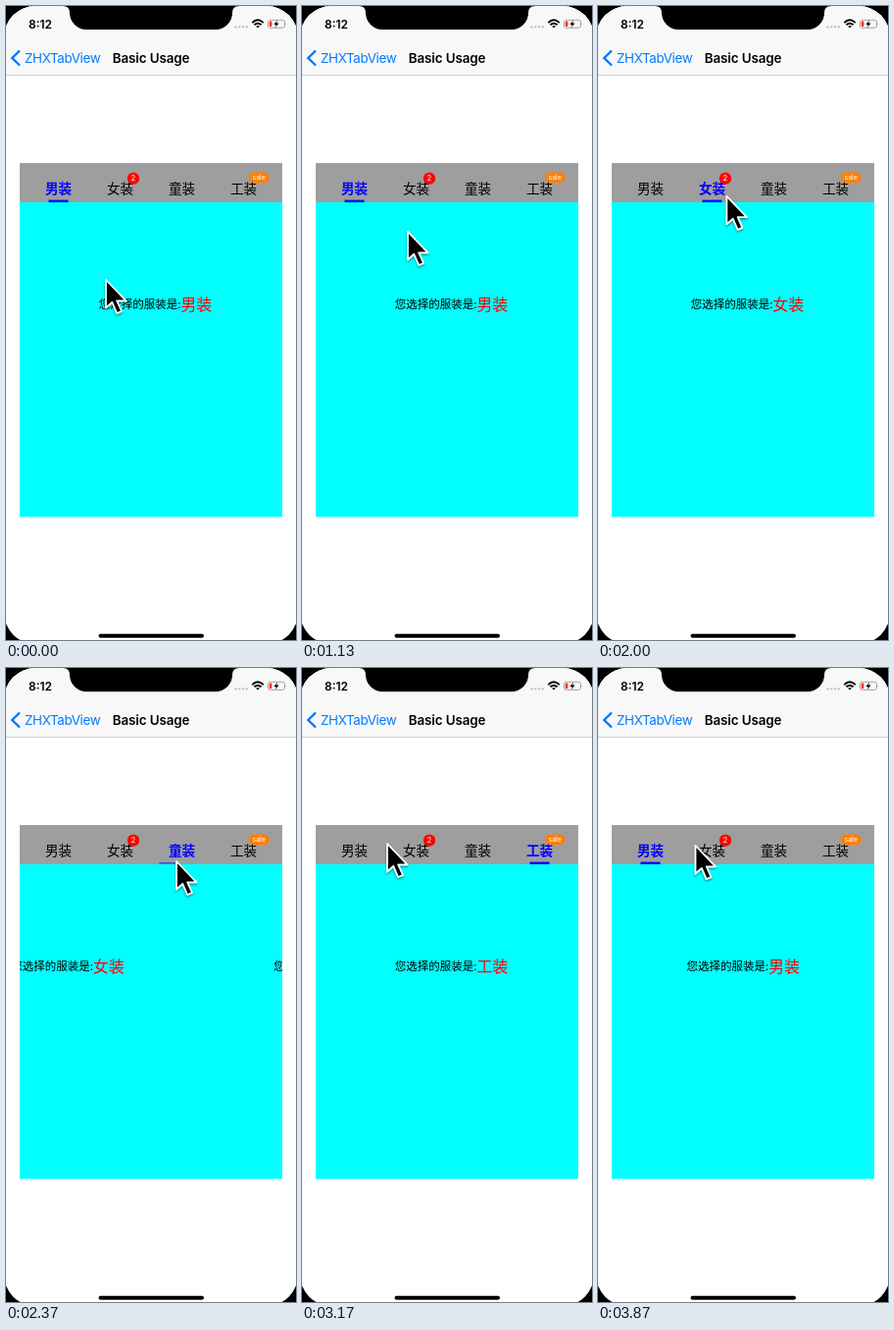
Recreate the animation shown at these times as an HTML page. Size 296 by 646 pixels, loop 3.91 s.

```html
<!DOCTYPE html>
<html lang="zh">
<head>
<meta charset="utf-8">
<title>Tab view</title>
<style>
  html, body { margin: 0; width: 100%; height: 100%; overflow: hidden; background: #fff; }
  svg { display: block; width: 100%; height: 100%; }
  text { font-family: Inter, "Noto Sans CJK SC", "Noto Sans CJK", "Noto Sans", sans-serif; }
  .cjk { font-family: "Noto Sans CJK SC", "Noto Sans CJK", sans-serif; }
  .tab { font-size: 13.6px; text-anchor: middle; }
  .tab.selected { fill: #00f; font-weight: 700; }
  .badge { fill: #fff; text-anchor: middle; }
  .choice { font-size: 16px; font-weight: 500; fill: #f00; }
</style>
</head>
<body>
<svg viewBox="0 0 296 646" xmlns="http://www.w3.org/2000/svg">
  <defs>
    <clipPath id="panel"><rect x="14" y="200" width="268" height="320"/></clipPath>
    <clipPath id="screen"><rect x="-2" width="300" height="650" rx="32"/></clipPath>
    <filter id="soft" x="-50%" y="-50%" width="200%" height="200%">
      <feDropShadow dx="0" dy="1.5" stdDeviation="1.3" flood-opacity=".45"/>
    </filter>
  </defs>
  <rect width="296" height="646"/>
  <g clip-path="url(#screen)">
    <rect width="296" height="646" fill="#fff"/>
    <rect width="296" height="70" fill="#f8f8f8"/>
    <rect y="70" width="296" height="1" fill="#d2d2d2"/>
  </g>

  <text x="23" y="22.5" font-size="12" font-weight="600">8:12</text>
  <g fill="#c4c4c4">
    <circle cx="234.5" cy="21.3" r="1.2"/><circle cx="238.3" cy="21.3" r="1.2"/>
    <circle cx="242.1" cy="21.3" r="1.2"/><circle cx="245.9" cy="21.3" r="1.2"/>
  </g>
  <g fill="none" stroke="#000" stroke-width="1.9">
    <path d="M251.3 17.1Q257 11.5 262.7 17.1M253.5 19.3Q257 16 260.5 19.3"/>
    <path d="M255.2 20.6Q257 19.2 258.8 20.6L257 22.5Z" fill="#000" stroke="none"/>
  </g>
  <rect x="267.5" y="14.3" width="17" height="8" rx="2.2" fill="none" stroke="#999" stroke-width=".9"/>
  <path d="M285.7 16.8q1.3 1.5 0 3z" fill="#999"/>
  <rect x="268.8" y="15.6" width="2.6" height="5.4" rx=".8" fill="#ff2d2d"/>
  <path d="M277 14.6L273.4 18.9H275.7L274.8 22L278.5 17.6H276.1Z"/>

  <path d="M14 45.5L6.3 53L14 60.5" fill="none" stroke="#007aff" stroke-width="2.4"/>
  <text x="19" y="57.8" font-size="13.4" letter-spacing="-.34" fill="#007aff">ZHXTabView</text>
  <text x="108.8" y="57.8" font-size="13.4" font-weight="600" letter-spacing="-.1">Basic Usage</text>

  <rect x="14" y="160" width="268" height="40" fill="#9e9e9e"/>
  <rect x="14" y="200" width="268" height="320.6" fill="#0ff"/>
  <g id="tabs"></g>
  <rect id="bar" width="20" fill="#00f"/>
  <circle cx="130" cy="175.6" r="6.2" fill="#f00"/>
  <text class="badge" x="130" y="178.4" font-size="7.8">2</text>
  <rect x="248" y="169.5" width="20.5" height="10.5" rx="5" fill="#ff7f00"/>
  <text class="badge" x="258.2" y="177" font-size="7">sale</text>
  <g clip-path="url(#panel)"><g id="pages"></g></g>

  <path d="M58 0Q65 0 65 7A17 17 0 0 0 82 24H214A17 17 0 0 0 231 7Q231 0 238 0Z"/>
  <rect x="94.5" y="639.8" width="107.5" height="4" rx="2"/>
  <path id="cursor" d="M0 0V28.5L6.3 22.8L11.2 34L16 32L11.2 21.3H20.5Z"
        stroke="#fff" stroke-width="1.8" stroke-linejoin="round" filter="url(#soft)"/>
</svg>
<script>
const LOOP = 3910, STEP = 100 / 3;
const PAGE_WIDTH = 268, TAB_GAP = 63, FIRST_TAB = 53.5;
const SCROLL_MS = 340, BAR_MS = 187;
const names = ['男装', '女装', '童装', '工装'];
const taps = [[1665, 1], [2235, 2], [2715, 3], [3541, 0]];
// Pointer stops: time, x, y
const stops = [
  [0, 102, 279], [630, 109, 491], [1130, 108, 230], [1500, 105, 193], [1700, 106, 192],
  [1850, 108, 192], [2220, 173, 197], [2366, 174, 197], [2680, 211, 197],
  [2866, 212, 197], [3166, 87, 179], [3430, 53, 181], [3600, 55, 182], [3866, 99.5, 181]
];

const byId = id => document.getElementById(id);
const mix = (a, b, k) => a + (b - a) * k;
const ease = p => {
  p = Math.min(1, Math.max(0, p));
  return p * p * (3 - 2 * p);
};

byId('tabs').innerHTML = names.map((name, i) =>
  `<text class="cjk tab" x="${FIRST_TAB + i * TAB_GAP}" y="190.9">${name}</text>`).join('');
byId('pages').innerHTML = names.map((name, i) => `
  <g transform="translate(${i * PAGE_WIDTH})">
    <text class="cjk" x="94.7" y="308.2" font-size="11.5">您选择的服装是:</text>
    <text class="cjk choice" x="178.2" y="309.8">${name}</text>
  </g>`).join('');
const tabs = [...byId('tabs').children];

function pointerAt(t) {
  const next = stops.findIndex(stop => stop[0] > t);
  if (next < 0) return stops[stops.length - 1].slice(1);
  const [from, to] = [stops[next - 1], stops[next]];
  const k = ease((t - from[0]) / (to[0] - from[0]));
  return [mix(from[1], to[1], k), mix(from[2], to[2], k)];
}

function render(t) {
  let from = 0, selected = 0, since = LOOP;
  for (const [time, tab] of taps) {
    if (t < time) break;
    from = selected;
    selected = tab;
    since = t - time;
  }
  const page = mix(from, selected, ease(since / SCROLL_MS));
  const barTab = mix(from, selected, ease(since / BAR_MS));
  const moving = since < BAR_MS;

  tabs.forEach((tab, i) => tab.classList.toggle('selected', i === selected));
  byId('pages').setAttribute('transform', `translate(${-page * PAGE_WIDTH})`);
  const bar = byId('bar');
  bar.setAttribute('x', FIRST_TAB - 10 + barTab * TAB_GAP);
  bar.setAttribute('y', moving ? 198 : 197.6);
  bar.setAttribute('height', moving ? 1.6 : 2.4);
  bar.setAttribute('opacity', moving ? 0.5 : 1);
  byId('cursor').setAttribute('transform', `translate(${pointerAt(t)})`);
}

const start = performance.now();
function tick() {
  const t = (performance.now() - start) % LOOP;
  render(Math.floor((t + 4) / STEP) * STEP);
  requestAnimationFrame(tick);
}
tick();
</script>
</body>
</html>
```
